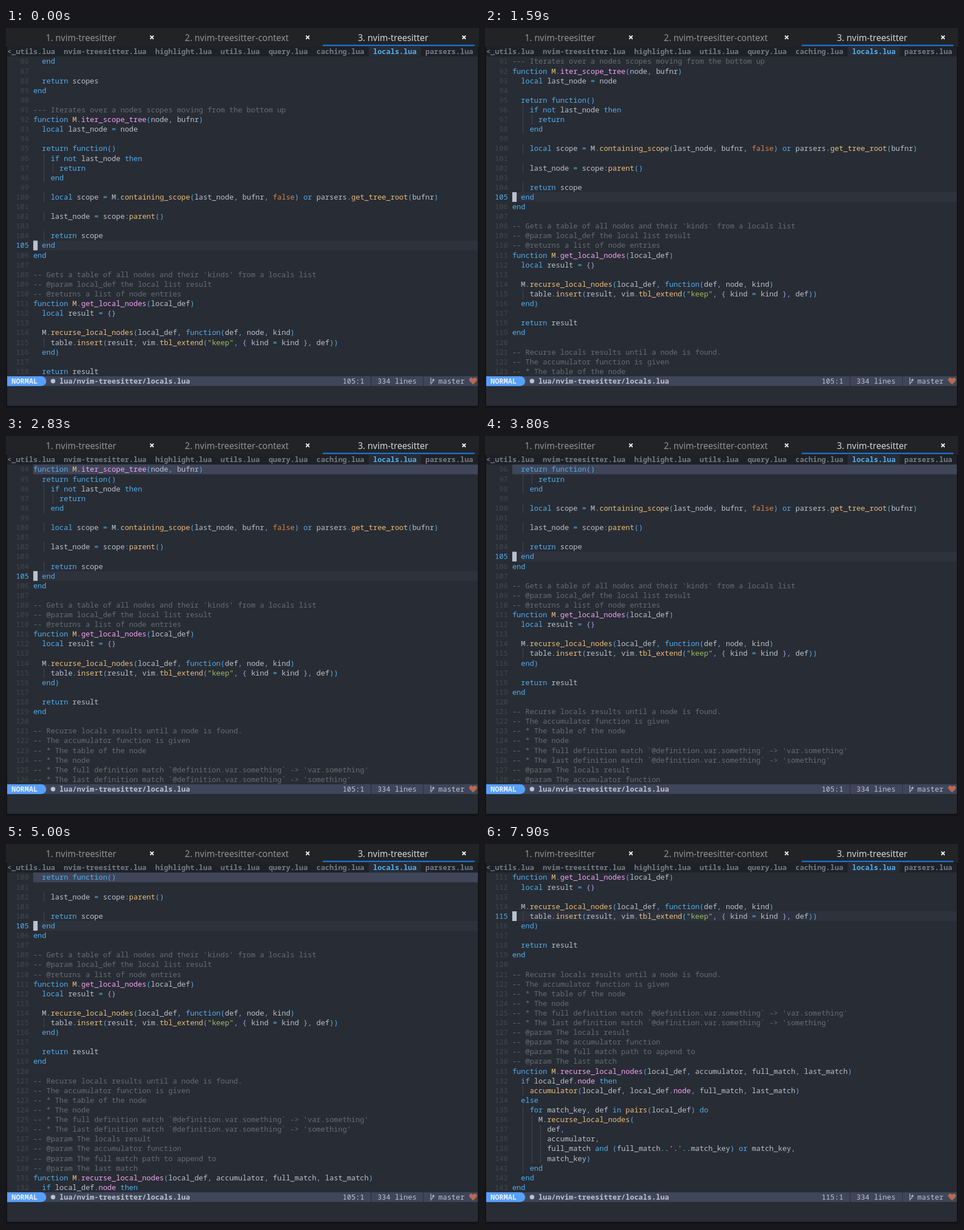
Animation, 835 px wide and 671 px high, one loop 8000 ms. Source, as an HTML page with a canvas:

```html
<!DOCTYPE html>
<html lang="en">
<head>
<meta charset="utf-8">
<title>Scrolling code editor</title>
<style>
  html, body { margin: 0; width: 100%; height: 100%; overflow: hidden; background: #111317; }
  canvas { display: block; }
</style>
</head>
<body>
<canvas id="stage" width="835" height="671"></canvas>
<script>
const ctx = document.getElementById('stage').getContext('2d');

const CELL = 7.69, ROW = 17.11, LEFT = 2, TOP = 50.4, ROWS = 33, RIGHT = 833;
const FIRST_LINE = 86, LOOP = 8000;
const MONO = '12.82px "Noto Sans Mono", monospace';
const COLOR = {
  bg: '#282c34', text: '#bbc2cf', blue: '#51afef', yellow: '#ecbe7b', pink: '#f5a3f7',
  orange: '#da8548', green: '#98be65', purple: '#a9a1e1', comment: '#686d75',
  number: '#42474f', guide: '#444a54', cursorLine: '#2d323d', bar: '#3f4659'
};
const KEYWORDS = new Set('function local return if not then end or and for in do else'.split(' '));

const CODE = `  end

  return scopes
end

--- Iterates over a nodes scopes moving from the bottom up
function M.iter_scope_tree(node, bufnr)
  local last_node = node

  return function()
    if not last_node then
      return
    end

    local scope = M.containing_scope(last_node, bufnr, false) or parsers.get_tree_root(bufnr)

    last_node = scope:parent()

    return scope
  end
end

-- Gets a table of all nodes and their 'kinds' from a locals list
-- @param local_def the local list result
-- @returns a list of node entries
function M.get_local_nodes(local_def)
  local result = {}

  M.recurse_local_nodes(local_def, function(def, node, kind)
    table.insert(result, vim.tbl_extend("keep", { kind = kind }, def))
  end)

  return result
end

-- Recurse locals results until a node is found.
-- The accumulator function is given
-- * The table of the node
-- * The node
-- * The full definition match \`@definition.var.something\` -> 'var.something'
-- * The last definition match \`@definition.var.something\` -> 'something'
-- @param The locals result
-- @param The accumulator function
-- @param The full match path to append to
-- @param The last match
function M.recurse_local_nodes(local_def, accumulator, full_match, last_match)
  if local_def.node then
    accumulator(local_def, local_def.node, full_match, last_match)
  else
    for match_key, def in pairs(local_def) do
      M.recurse_local_nodes(
        def,
        accumulator,
        full_match and (full_match..'.'..match_key) or match_key,
        match_key)
    end
  end
end`.split('\n');

// Each time scrolls the view down by one line, starting at FIRST_LINE.
const SCROLLS = [860, 1120, 1300, 1440, 1590, 1770, 2250, 2830, 3390, 3800, 4230, 4480, 4790, 5000];

const colX = col => LEFT + col * CELL;
const rowY = row => TOP + row * ROW;

function rect(x, y, w, h, color) {
  ctx.fillStyle = color;
  ctx.fillRect(x, y, w, h);
}

function text(str, col, row, color, weight = '') {
  ctx.font = weight + ' ' + MONO;
  ctx.fillStyle = color;
  ctx.fillText(str, colX(col), rowY(row) + 13);
}

function path(d, color, width) {
  const shape = new Path2D(d);
  if (width) {
    ctx.strokeStyle = color;
    ctx.lineWidth = width;
    ctx.stroke(shape);
  } else {
    ctx.fillStyle = color;
    ctx.fill(shape);
  }
}

function tokenColor(token, before, after) {
  if (/^["']/.test(token)) return COLOR.green;
  if (/[{}]/.test(token)) return COLOR.purple;
  if (!/\w/.test(token) || KEYWORDS.has(token)) return COLOR.blue;
  if (token === 'false') return COLOR.orange;
  if (before === 'function ') return COLOR.yellow;
  if (before === 'function M.' || before.endsWith('.') && token === 'node') return COLOR.pink;
  return after.startsWith('(') ? COLOR.yellow : COLOR.text;
}

function codeLine(line, row) {
  if (line.startsWith('--')) return text(line, 6, row, COLOR.comment);
  const indent = line.search(/\S/);
  for (let col = 2; col < indent; col += 2) {
    rect(Math.round(colX(col + 6.5)) - 0.5, rowY(row), 1, ROW, COLOR.guide);
  }
  for (const { 0: token, index } of line.matchAll(/"[^"]*"|'[^']*'|\w+|[^\s\w]/g)) {
    const color = tokenColor(token, line.slice(0, index), line.slice(index + token.length));
    text(token, 6 + index, row, color);
  }
}

function stateAt(time) {
  let top = FIRST_LINE + SCROLLS.filter(t => t <= time).length;
  if (time >= 6750) top = time < 7900 ? 110 : 111;
  const cursor = time < 5750 ? 105 : time < 5920 ? 110 : 115;
  const context = cursor > 105 || top < 93 ? 0 : top < 96 ? 92 : 95;
  return { top, cursor, context };
}

function windowTabs() {
  rect(0, 0, 835, 33, '#222325');
  rect(559, 29.5, 268, 2.5, '#1f6fd0');
  ctx.font = '15.45px "Noto Sans", sans-serif';
  ctx.textAlign = 'center';
  [['1. nvim-treesitter', 132.5, 257.5],
   ['2. nvim-treesitter-context', 407.5, 532.5],
   ['3. nvim-treesitter', 683.5, 808.5]].forEach(([title, x, closeX], i) => {
    ctx.fillStyle = i === 2 ? '#d6d6d6' : '#929394';
    ctx.fillText(title, x, 22.5);
    path(`M${closeX - 3} 13.5l6 6m0-6l-6 6`, '#f2f2f2', 2);
  });
  ctx.textAlign = 'left';
}

function bufferTabs() {
  rect(LEFT, 33, RIGHT - LEFT, TOP - 33, '#1e2127');
  const names = '<_utils nvim-treesitter highlight utils query caching locals parsers'.split(' ');
  let col = 0;
  for (const name of names) {
    const label = name + '.lua', active = name === 'locals';
    if (active) rect(colX(col - 1), 33, CELL * (label.length + 2), TOP - 33, COLOR.bg);
    text(label, col, -1, active ? COLOR.blue : '#757b84', 'bold');
    col += label.length + 2;
  }
}

function statusLine(cursor) {
  const y = rowY(ROWS), mid = y + ROW / 2;
  rect(LEFT, y, RIGHT - LEFT, ROW, COLOR.bar);
  ctx.fillStyle = '#579ffb';
  ctx.beginPath();
  ctx.roundRect(LEFT, y, 69, ROW, [0, 8.5, 8.5, 0]);
  ctx.fill();
  text('NORMAL', 1, ROWS, '#e8f0fb', 'bold');
  ctx.fillStyle = COLOR.text;
  ctx.beginPath();
  ctx.arc(83, mid, 4, 0, 7);
  ctx.fill();
  text('lua/nvim-treesitter/locals.lua', 12, ROWS, COLOR.text, 'bold');
  text(cursor + ':1', 77, ROWS, COLOR.text);
  text('334 lines', 85, ROWS, COLOR.text);
  text('master', 99, ROWS, COLOR.text);
  for (const col of [83.5, 95.5]) rect(colX(col), y, 1, ROW, '#2a2e38');
  path(`M750 ${mid - 6}v12m0-2.5q4.5-1 4.5-6.5m-2 2l2-2.5l2 2.5`, COLOR.text, 1.2);
  path(`M824.5 ${mid + 6}l-6-6c-3-5 3.5-8.5 6-4c2.5-4.5 9-1 6 4z`, '#b96a50');
}

function draw({ top, cursor, context }) {
  rect(0, 0, 835, 671, '#111317');
  rect(LEFT, 33, RIGHT - LEFT, 634, COLOR.bg);
  windowTabs();
  bufferTabs();
  for (let row = 0; row < ROWS; row++) {
    const number = top + row, current = number === cursor;
    const pinned = row === 0 && context;
    if (pinned || current) {
      rect(colX(6), rowY(row), RIGHT - colX(6), ROW, pinned ? COLOR.bar : COLOR.cursorLine);
    }
    text(String(number).padStart(3), 2, row, current ? COLOR.blue : COLOR.number);
    codeLine(CODE[(pinned || number) - FIRST_LINE], row);
    if (current) rect(colX(6), rowY(row), CELL, ROW, COLOR.text);
  }
  statusLine(cursor);
}

const start = performance.now();
function tick() {
  draw(stateAt((performance.now() - start) % LOOP));
  requestAnimationFrame(tick);
}
tick();
</script>
</body>
</html>
```
